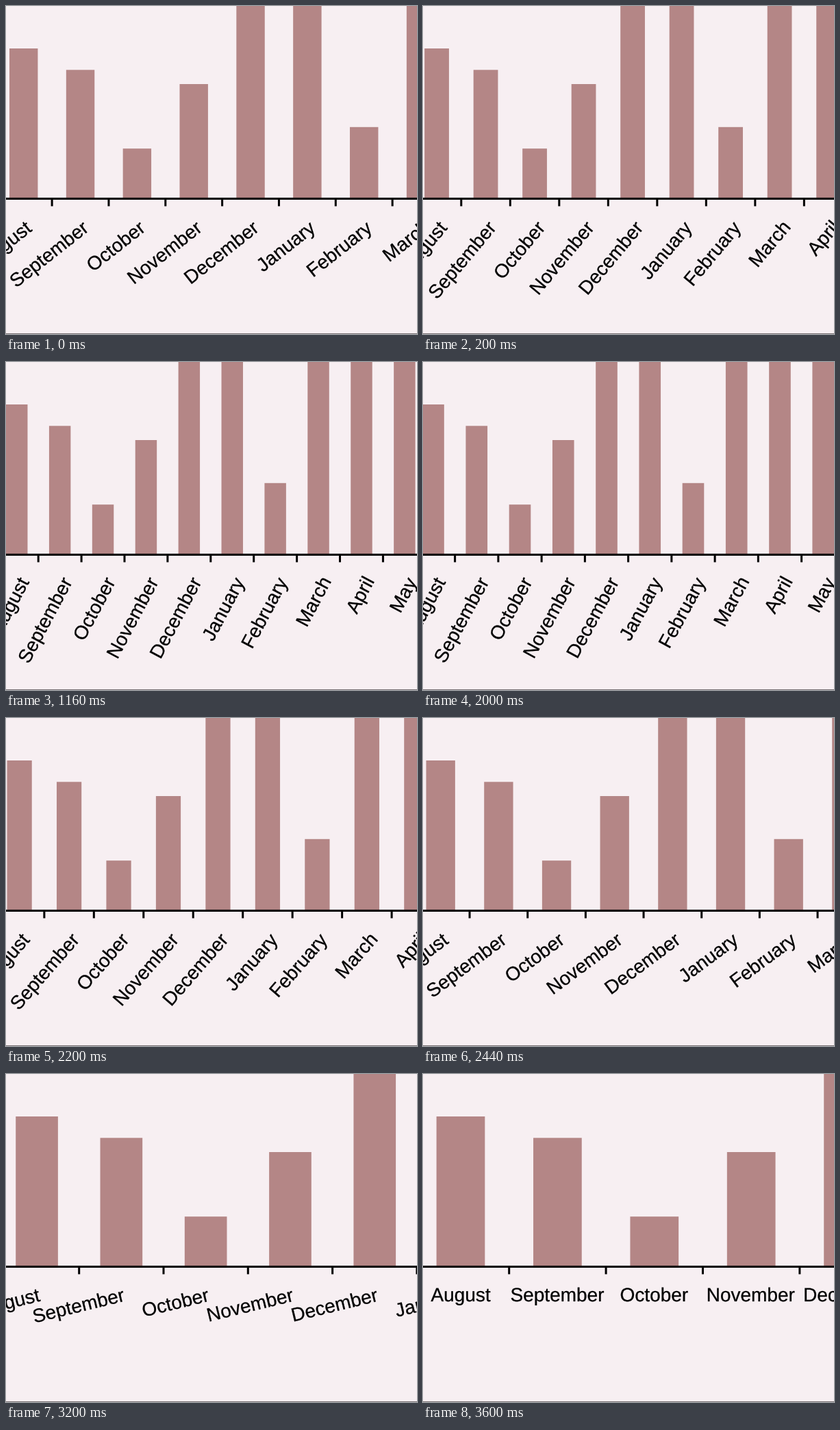
A matplotlib script that plays this animation: 600 px wide and 479 px high, repeating every 4 s.

```python
import matplotlib.pyplot as plt
from matplotlib.animation import FuncAnimation
from matplotlib.patches import PathPatch, Rectangle
from matplotlib.textpath import TextPath
from matplotlib.transforms import Affine2D

WIDTH, HEIGHT, DPI = 600, 479, 64
FRAMES, INTERVAL = 100, 40

BACKGROUND = "#f7eff2"
BAR = "#b48686"
AXIS_Y, LINE, LABEL_Y = 281.4, 3, 312
FONT_SIZE, CAP_HEIGHT = 28, 20
NARROW, MIDDLE, WIDE = 62.9, 82.83, 141.4
FIT_STEP = 139          # bands wider than this hold flat labels
GROW_START, GROW_STEPS = 49.1, 41

BAR_TOPS = {
    "August": 62, "September": 93.3, "October": 208.2, "November": 114,
    "December": -10, "January": -10, "February": 176.8,
    "March": -10, "April": -10, "May": -10,
}

plt.rcParams["font.family"] = "Liberation Sans"


def ramp(t, ease=2.4):
    """Distance covered at unit speed after a short acceleration."""
    if t <= 0:
        return 0
    return t * t / (2 * ease) if t < ease else t - ease / 2


def glide(t, steps, ease=2.4):
    """Progress from 0 to 1, speeding up and slowing down at the ends."""
    return (ramp(t, ease) - ramp(t - steps + ease, ease)) / (steps - ease)


def band_step(frame):
    if frame < 10:
        return NARROW + (MIDDLE - NARROW) * ramp(10 - frame) / ramp(10)
    t = min(frame - GROW_START, GROW_STEPS)
    return NARROW + (WIDE - NARROW) * glide(t, GROW_STEPS)


def left_edge(frame):
    """The chart sits a pixel further left while it widens."""
    return -16.6 if 50 <= frame < 90 else -15.7


def label_angle(step):
    return 0 if step > FIT_STEP else 6200 / step - 36.6


fig = plt.figure(figsize=(WIDTH / DPI, HEIGHT / DPI), dpi=DPI,
                 facecolor=BACKGROUND)
ax = fig.add_axes([0, 0, 1, 1])
ax.set_xlim(0, WIDTH)
ax.set_ylim(HEIGHT, 0)
ax.axis("off")


def add_box(x, y, w, h, color, z=1):
    return ax.add_patch(Rectangle((x, y), w, h, fc=color, lw=0, zorder=z,
                                  snap=False))


class Band:
    def __init__(self, index, name, top):
        self.index = index
        self.bar = add_box(0, top, 1, AXIS_Y - top, BAR)
        self.tick = add_box(0, AXIS_Y, LINE, 11, "black", 2)
        path = TextPath((0, 0), name, size=FONT_SIZE)
        box = path.get_extents()
        self.middle, self.end = (box.x0 + box.x1) / 2, box.x1
        self.label = ax.add_patch(PathPatch(path, fc="black", ec="black",
                                            lw=0.3, zorder=3))

    def place(self, left, step, angle):
        center = left + (self.index + 0.5) * step
        self.bar.set_x(center - step / 4)
        self.bar.set_width(step / 2)
        self.tick.set_x(center + step / 2 - LINE / 2)
        anchor, shift = (self.end, 1) if angle else (self.middle, 0)
        move = (Affine2D().translate(-anchor, -CAP_HEIGHT)
                .rotate_deg(angle).scale(1, -1)
                .translate(center + shift, LABEL_Y))
        self.label.set_transform(move + ax.transData)


bands = [Band(i, name, top) for i, (name, top) in enumerate(BAR_TOPS.items())]
add_box(0, AXIS_Y - LINE / 2, WIDTH, LINE, "black", 2)
add_box(0, HEIGHT - 1, WIDTH, 1, "#766f73", 2)


def update(frame):
    step = band_step(frame)
    for band in bands:
        band.place(left_edge(frame), step, label_angle(step))
    return []


anim = FuncAnimation(fig, update, frames=FRAMES, interval=INTERVAL,
                     repeat=True, repeat_delay=0, blit=False)
plt.show()
```
